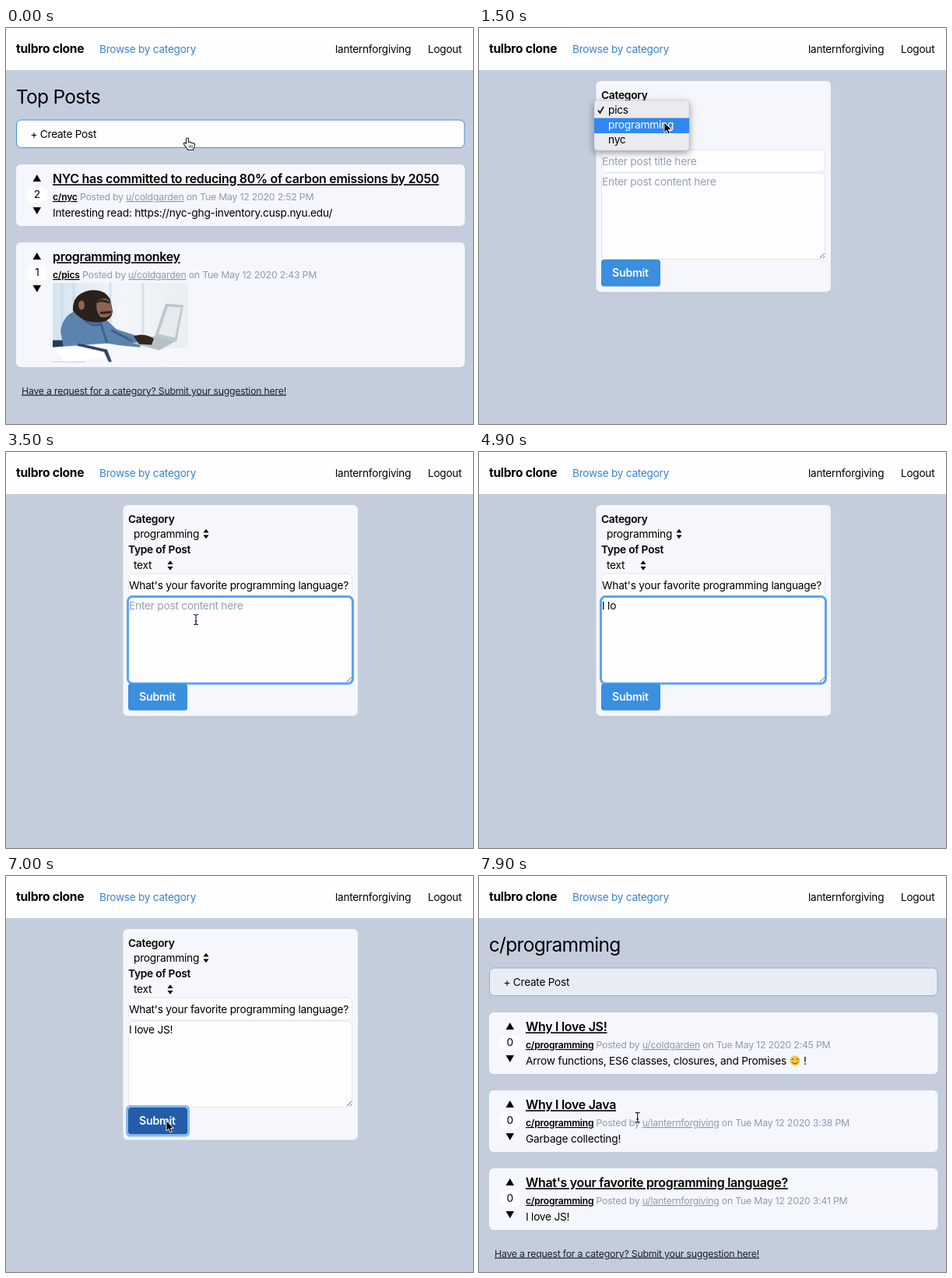
An HTML page for the animation above (8000 ms loop, 600 by 508 pixels).

```html
<!DOCTYPE html>
<html lang="en">
<head>
<meta charset="utf-8">
<title>Forum post demo</title>
<style>
  html, body { margin: 0; width: 100%; height: 100%; overflow: hidden; background: #c4cddc; }
  svg { display: block; width: 600px; height: 508px; }
  text { font: 400 13.74px Inter, "Open Sans", sans-serif; letter-spacing: -.018em; fill: #000; }
  .nav { font-size: 13.6px; }
  .brand { font-size: 15.6px; font-weight: 700; }
  .bold { font-weight: 600; }
  .blue { fill: #3884d0; }
  .heading { font-size: 24.6px; letter-spacing: -.03em; }
  .title { font-size: 15.97px; font-weight: 600; text-decoration: underline; }
  .meta { font-size: 12.3px; fill: #8e9bb0; }
  .cat { font-size: 12.1px; font-weight: 600; fill: #000; text-decoration: underline; }
  .user { text-decoration: underline; }
  .note { font-size: 12.3px; fill: #1d2430; text-decoration: underline; }
  .count { text-anchor: middle; }
  .hint { fill: #94a1b5; }
  .white { fill: #fff; }
  .card { fill: #f5f7fc; }
  .field { fill: #fefdff; stroke: #dfe6ef; }
  .ring { fill: none; stroke: #5ba5f4; stroke-width: 3; }
  .menu { filter: drop-shadow(0 3px 5px #0006); }
</style>
</head>
<body>
<svg viewBox="0 0 600 508">
  <defs>
    <clipPath id="photoClip"><rect width="174" height="102"/></clipPath>
    <linearGradient id="photoSky" x2="1">
      <stop stop-color="#d5e3ee"/><stop offset=".5" stop-color="#f3f6f8"/><stop offset="1" stop-color="#e9eef2"/>
    </linearGradient>
    <path id="sorter" d="M-3.5-1.5 0-6.3 3.5-1.5ZM-3.5 1.5 0 6.3 3.5 1.5Z"/>
    <path id="beamShape" d="M-3-6.5Q0-6.5 0-5 0-6.5 3-6.5M0-5V5M-3 6.5Q0 6.5 0 5 0 6.5 3 6.5M-1.5 2h3"/>
  </defs>
  <rect width="600" height="508" fill="#c4cddc"/>
  <rect width="600" height="54" fill="#fefdff"/>
  <text class="brand" x="13" y="32">tulbro clone</text>
  <text class="nav blue" x="120" y="32">Browse by category</text>
  <text class="nav" x="423" y="31.5">lanternforgiving</text>
  <text class="nav" x="542" y="31.5">Logout</text>

  <g id="topPage"></g>

  <g id="formPage">
    <rect class="card" x="150.5" y="68" width="301.5" height="270.5" rx="6"/>
    <text class="bold" x="157" y="90.5">Category</text>
    <rect x="157" y="96" width="105" height="17" fill="#f8f7f9"/>
    <text id="category" x="164" y="109.5"></text>
    <use href="#sorter" x="257" y="105"/>
    <text class="bold" x="157" y="129.5">Type of Post</text>
    <rect x="157" y="137" width="59" height="17" fill="#f8f7f9"/>
    <text x="164" y="150.3">text</text>
    <use href="#sorter" x="211" y="145.5"/>
    <rect class="field" x="157.5" y="156" width="287" height="29" rx="6"/>
    <rect class="field" x="157.5" y="186" width="287" height="110.5" rx="6"/>
    <path d="M438 295l6-6M442 295l2-2" stroke="#666"/>
    <rect id="titleRing" class="ring" x="156.5" y="155.5" width="289" height="30" rx="6"/>
    <rect id="bodyRing" class="ring" x="156.5" y="185.5" width="289" height="111.5" rx="6"/>
    <text id="titleText" x="158" y="176"></text>
    <text id="bodyText" x="158" y="202"></text>
    <path id="caret" d="M0-11.5V3.5" stroke="#000"/>
    <rect id="submit" x="157" y="297" width="76" height="34.5" rx="3.5"/>
    <rect id="submitRing" class="ring" x="155.5" y="295.5" width="79" height="37.5" rx="4" style="stroke:#82bbf5"/>
    <text class="bold white" x="171" y="319" style="font-size:14.2px">Submit</text>
    <g id="menu">
      <rect class="menu" x="148" y="93" width="122" height="64" rx="4" fill="#ebebed" stroke="#b9bec8" stroke-width=".5"/>
      <rect id="highlight" x="148" width="122" height="19.5" fill="#2f88f2"/>
      <path id="check" d="M153 105.5l2.5 3.5 4.5-8" fill="none" stroke-width="1.7"/>
      <text id="option0" x="166" y="109.5">pics</text>
      <text id="option1" x="166" y="129">programming</text>
      <text id="option2" x="166" y="148">nyc</text>
    </g>
  </g>

  <g id="listPage"></g>

  <g id="hand">
    <g transform="scale(.92)">
      <path d="M-1.7 1q0-2 1.7-2t1.7 2v4q3-1 3.4.8 2.6-.7 3 .8 2.2-.4 2.2 1.6 0 4-2 6v1.3H.8L-4.6 8.3q-1.3-2 .3-2.6 1.2-.3 2.6 1.3Z" fill="#fff" stroke="#111" stroke-width="1.1"/>
      <path d="M2.5 9v4M4.7 9v4M6.8 9v4" stroke="#111" stroke-width=".8"/>
    </g>
  </g>
  <path id="arrow" d="M0 0V13L3 10.3 5 15 7.4 14 5.4 9.4H9.4Z" stroke="#fff" stroke-width=".9"/>
  <g id="beam" fill="none">
    <use href="#beamShape" stroke="#fff" stroke-width="2.4" opacity=".6"/>
    <use href="#beamShape" stroke="#111" stroke-width="1.1"/>
  </g>
</svg>
<script>
const el = Object.fromEntries([...document.querySelectorAll('[id]')].map(n => [n.id, n]));
const QUESTION = "What's your favorite programming language?";
const ANSWER = 'I love JS!';

const post = (y, votes, title, category, user, time, body, height = 79) => `
  <g transform="translate(0 ${y})">
    <rect class="card" x="13" width="576.5" height="${height}" rx="6"/>
    <path d="M34.5 22 39.8 13 45 22ZM34.5 55 39.8 64 45 55Z"/>
    <rect x="26.5" y="28" width="26.5" height="21" rx="8" fill="#fefdff"/>
    <text class="count" x="39.8" y="43.3">${votes}</text>
    <text class="title" x="60" y="24.3">${title}</text>
    <text class="meta" x="60" y="46"><tspan class="cat">c/${category}</tspan> Posted by <tspan class="user">u/${user}</tspan> on Tue May 12 2020 ${time} PM</text>
    ${body}
  </g>`;
const line = content => `<text x="60" y="67">${content}</text>`;

const page = (heading, fill, stroke, posts, noteY) => `
  <text class="heading" x="12.8" y="97">${heading}</text>
  <rect x="13.5" y="118" width="575.5" height="35.5" rx="6" fill="${fill}" stroke="${stroke}"/>
  <text class="nav" x="31.5" y="141">+ Create Post</text>${posts}
  <text class="note" x="20" y="${noteY}">Have a request for a category? Submit your suggestion here!</text>`;

const photo = `
  <g transform="translate(60 51.5)" clip-path="url(#photoClip)">
    <rect width="174" height="102" fill="url(#photoSky)"/>
    <path d="M12 0V70M27 0V70M74 0V60M116 0V65" stroke="#c3d8e8" stroke-width="3" opacity=".6"/>
    <path d="M0 74H30L42 102H0Z" fill="#273a55"/>
    <path d="M10 62Q14 38 36 35L66 45 82 60 116 71 112 83 78 80 66 88 14 84Z" fill="#5c83ad"/>
    <path d="M37 43Q48 59 62 53L70 78M75 61 102 75" fill="none" stroke="#3b618c" stroke-width="3"/>
    <path d="M26 36Q25 14 48 10 67 8 74 22L77 37Q76 49 61 51 39 53 26 36Z" fill="#2a201c"/>
    <ellipse cx="37" cy="29" rx="4" ry="6" fill="#8a6550"/>
    <path d="M57 23Q69 17 74 25L77 38Q72 47 61 44 54 35 57 23Z" fill="#8a6651"/>
    <path d="M56 25Q64 21 73 26M61 39l14-1" fill="none" stroke="#30231e" stroke-width="3"/>
    <path d="M0 83 70 78 112 85 174 84V102H0Z" fill="#f5f7f8"/>
    <path d="M2 86 55 80 70 96 18 102Z" fill="#fff"/>
    <path d="M34 78 70 86 76 102H72L66 89 31 81Z" fill="#354765"/>
    <path d="M103 78 133 68 160 74 137 87Z" fill="#b7c0c7"/>
    <path d="M131 69 145 27 168 29 159 76Z" fill="#bcc7ce"/>
    <path d="M136 66 148 31 165 32 157 71Z" fill="#e4eaed"/>
    <path d="M104 69Q117 64 130 72L127 80 111 79Z" fill="#352620"/>
  </g>`;

const emoji = `
  <circle cx="406" cy="62" r="6.5" fill="#f8c845"/>
  <path d="M401.5 60.5q1.5-2 3 0M407.5 60.5q1.5-2 3 0M402 63.5q4 5 8 0" fill="none" stroke="#744315"/>
  <text x="417" y="67">!</text>`;

el.topPage.innerHTML = page('Top Posts', '#fefdff', '#4390d9',
  post(175, 2, 'NYC has committed to reducing 80% of carbon emissions by 2050', 'nyc', 'coldgarden', '2:52',
    line('Interesting read: https://nyc-ghg-inventory.cusp.nyu.edu/')) +
  post(275, 1, 'programming monkey', 'pics', 'coldgarden', '2:43', photo, 160), 469.5);

el.listPage.innerHTML = page('c/programming', '#e8edf5', '#9aabc2',
  post(175, 0, 'Why I love JS!', 'programming', 'coldgarden', '2:45',
    line('Arrow functions, ES6 classes, closures, and Promises') + emoji) +
  post(275, 0, 'Why I love Java', 'programming', 'lanternforgiving', '3:38', line('Garbage collecting!')) +
  post(375, 0, QUESTION, 'programming', 'lanternforgiving', '3:41', line(ANSWER)), 488.5);

// Pointer hotspot: time, x, y
const route = [
  [0, 233, 142], [200, 236, 143], [400, 244, 146], [900, 238, 105], [1200, 238, 105],
  [1500, 238, 121], [1700, 238, 123], [1900, 244, 171], [2300, 244, 174], [2500, 244, 179],
  [3000, 244, 215], [5900, 244, 215], [6700, 206, 314], [7400, 206, 314], [8000, 203.5, 309.5]
];

function pointerAt(t) {
  const i = route.findIndex(p => p[0] > t);
  const [a, b] = [route[i - 1], route[i]];
  const u = (t - a[0]) / (b[0] - a[0]);
  const ease = u * u * (3 - 2 * u);
  return [a[1] + (b[1] - a[1]) * ease, a[2] + (b[2] - a[2]) * ease];
}

const show = (node, on) => { node.style.display = on ? '' : 'none'; };

function fillField(node, value, hint) {
  node.textContent = value || hint;
  node.setAttribute('class', value ? '' : 'hint');
}

function render(t) {
  const during = (from, to) => t >= from && t < to;
  const [x, y] = pointerAt(t);
  const form = during(200, 7400);
  const menuOpen = during(1000, 1700);
  show(el.topPage, t < 200);
  show(el.formPage, form);
  show(el.listPage, t >= 7400);

  el.category.textContent = t < 1700 ? 'pics' : 'programming';
  show(el.menu, menuOpen);
  const chosen = y < 115 ? 0 : 1;
  el.highlight.setAttribute('y', 96 + chosen * 19.5);
  [0, 1, 2].forEach(i => el['option' + i].setAttribute('class', i === chosen ? 'white' : ''));
  el.check.setAttribute('stroke', chosen ? '#111' : '#fff');

  const title = t < 2100 ? '' : QUESTION;
  const typed = t < 4700 ? 0 : t < 5000 ? 2 + (t - 4700) / 100 : 4 + Math.floor((t - 4900) / 150);
  const body = ANSWER.slice(0, typed);
  fillField(el.titleText, title, 'Enter post title here');
  fillField(el.bodyText, body, 'Enter post content here');

  const inTitle = during(1900, 3100), inBody = during(3100, 6900);
  show(el.titleRing, inTitle);
  show(el.bodyRing, inBody);
  show(el.submitRing, t >= 6900);
  const blink = Math.floor(t / 500) % 2;
  show(el.caret, inTitle && blink || inBody && !blink);
  if (form) {
    const node = inTitle ? el.titleText : el.bodyText;
    const width = (inTitle ? title : body) ? node.getComputedTextLength() : 0;
    el.caret.setAttribute('transform', `translate(${158.5 + width} ${inTitle ? 176 : 202})`);
  }
  el.submit.setAttribute('fill', form && y > 297 && x < 233 ? '#235da8' : '#3a8fdf');

  const overField = form && !menuOpen && x < 445 && y > 156 && y < 297;
  const kind = during(4600, 5900) ? '' : t < 200 ? 'hand' : overField || t >= 7400 ? 'beam' : 'arrow';
  for (const name of ['hand', 'arrow', 'beam']) {
    show(el[name], name === kind);
    el[name].setAttribute('transform', `translate(${x} ${y})`);
  }
}

const start = performance.now();
function tick() {
  const t = (performance.now() - start) % 8000;
  render(Math.floor(t / 100) * 100);
  requestAnimationFrame(tick);
}
tick();
</script>
</body>
</html>
```
